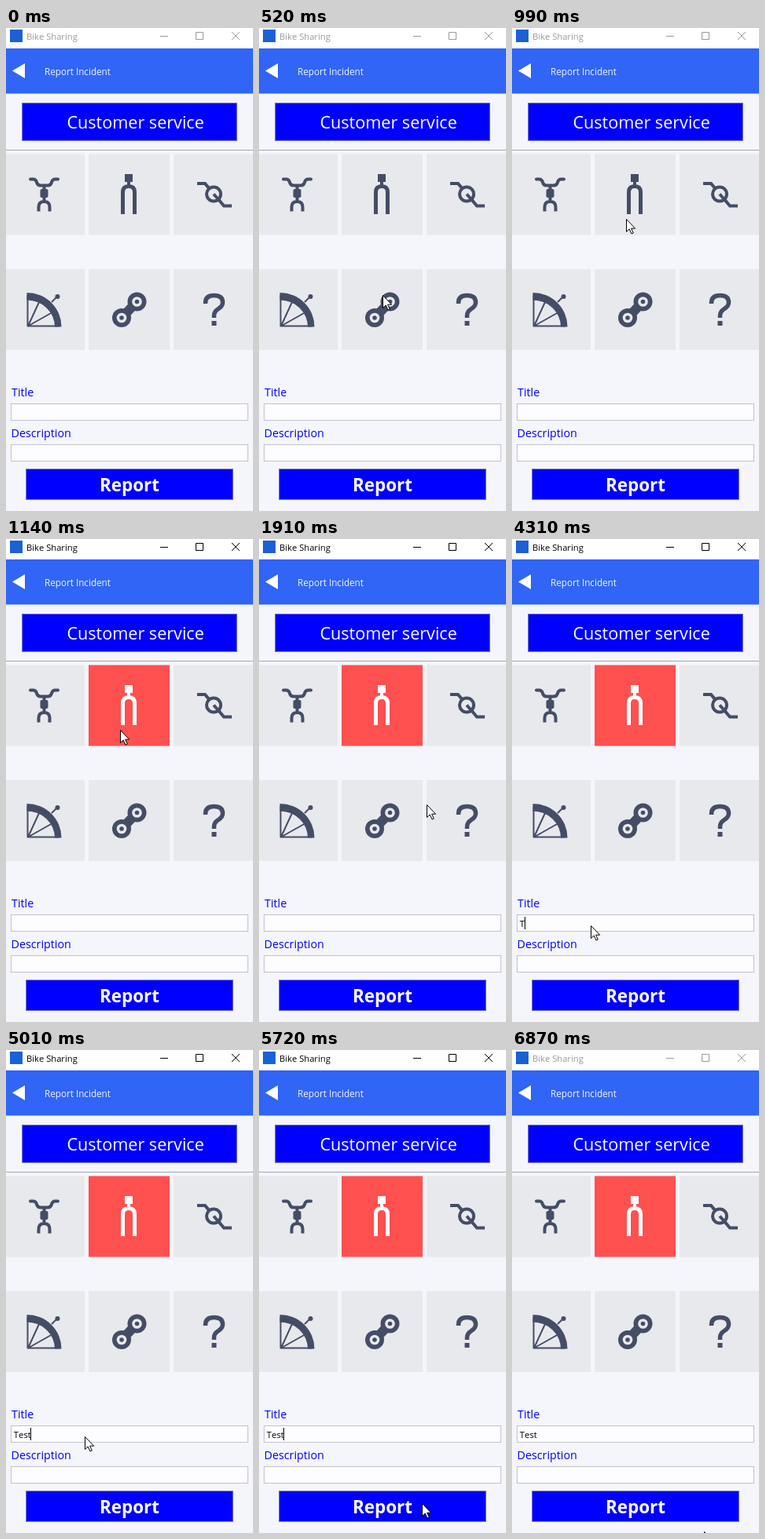
An HTML page that plays this animation: 314x615 px, repeating every 6.95 s.

```html
<!DOCTYPE html>
<html lang="en">
<head>
<meta charset="utf-8">
<title>Report Incident</title>
<style>
  html, body { margin: 0; width: 100%; height: 100%; overflow: hidden; background: #f4f6fb; }
  svg { display: block; width: 314px; height: 615px; }
  text { font-family: "Open Sans", "Noto Sans", sans-serif; font-kerning: none; white-space: pre; }
  .icon { color: #454d66; fill: none; stroke: currentColor; stroke-width: 4; }
  .solid { fill: currentColor; stroke: none; }
  .tile { fill: #e8e9ed; }
  .button { fill: #00f; stroke: #8484bc; }
  .field { fill: #fdfdff; stroke: #c0c2cb; }
  .label { fill: #00f; font-size: 14.3px; }
</style>
</head>
<body>
<svg viewBox="0 0 314 615">
  <!-- window bar -->
  <rect width="314" height="26" fill="#fff"/>
  <rect x="5" y="2" width="16" height="16" fill="#1c60d6"/>
  <g id="bar" color="#999">
    <text x="26" y="15" font-size="11.2" fill="currentColor">Bike Sharing</text>
    <path d="M196 10.5h10M241.5 5.5h9v9h-9zM287 5l10 10M297 5l-10 10" fill="none" stroke="currentColor"/>
  </g>

  <!-- page header -->
  <rect y="26" width="314" height="57.5" fill="#3065f5"/>
  <path d="M8 54.5 24 45V64z" fill="#fff"/>
  <text x="49" y="60" font-size="11.7" fill="#f2f5ff">Report Incident</text>

  <rect class="button" x="20.5" y="95.5" width="273" height="48"/>
  <text x="77.4" y="128" font-size="21.6" fill="#fff">Customer service</text>
  <path d="M0 155.5h314" stroke="#a3a5ab"/>

  <g id="tiles" class="tile"></g>

  <!-- handlebar -->
  <g class="icon">
    <path d="M31 192.5h3.5q3.5 0 4.5 4t5 4h9q4 0 5-4t4.5-4H66" stroke-linecap="round"/>
    <path d="M48.5 201v20M41.5 233.5V228q0-7 7-7t7 7v5.5"/>
    <rect class="solid" x="43.5" y="205" width="10" height="11" rx="2"/>
  </g>

  <!-- fork -->
  <g class="icon" id="fork">
    <rect class="solid" x="151" y="186" width="10" height="10"/>
    <path d="M156 196v6"/>
    <path d="M148.5 237V209q0-7.500 7.500-7.500t7.500 7.500v28" stroke-width="5"/>
  </g>

  <!-- crank -->
  <g class="icon">
    <path d="M243 198h10l24 28.500h10"/>
    <circle cx="264" cy="211.500" r="9" class="tile"/>
    <path d="m264 211.500 8 9"/>
  </g>

  <!-- wheel -->
  <g class="icon" stroke-linejoin="round">
    <path class="solid" d="M26.500 337a44 43.500 0 0 1 44 43.500H62a35.500 34 0 0 0-35.500-34z"/>
    <path d="M27.500 340v39.500h40M28 379.500 42 349M28 379.500 59 362" style="stroke-width: 2"/>
    <path d="m58 349 7-7" style="stroke-width: 2"/>
    <circle class="solid" cx="65.500" cy="342" r="3"/>
  </g>

  <!-- chain link -->
  <g class="icon">
    <path d="m147 369 19.500-20.500" style="stroke-width: 12"/>
    <g id="roller">
      <circle class="solid" cx="147" cy="369" r="12"/>
      <circle class="tile" cx="147" cy="369" r="6.300" stroke="none"/>
      <circle class="solid" cx="147" cy="369" r="2.800"/>
    </g>
    <use href="#roller" x="19.500" y="-20.500"/>
  </g>

  <!-- question mark -->
  <g class="icon">
    <path d="M253.500 351v-1q0-9.500 11-9.500t11 9q0 4.500-5.500 8t-5.500 8.500v3" style="stroke-width: 5.500"/>
    <rect class="solid" x="261.500" y="373" width="6" height="6"/>
  </g>

  <!-- form -->
  <text class="label" x="7" y="469">Title</text>
  <rect class="field" x="6.500" y="478.500" width="301" height="21"/>
  <text class="label" x="6.500" y="521">Description</text>
  <rect class="field" x="6.500" y="530.500" width="301" height="21"/>
  <text id="typed" x="9.800" y="494" font-size="11.300"></text>
  <rect id="caret" y="481" width="1" height="16" opacity="0"/>
  <rect class="button" x="25.500" y="561.500" width="263" height="39"/>
  <text x="119" y="590" font-size="22.400" font-weight="700" fill="#fff">Report</text>

  <path id="pointer" d="M.5.500v16l3.700-3.500 2.800 6 2.300-1-2.700-5.800h5z" fill="#fff" stroke="#000" opacity="0"/>
</svg>
<script>
const LOOP = 6950;
const $ = id => document.getElementById(id);

function add(parent, tag, attrs = {}, text = "") {
  const el = document.createElementNS("http://www.w3.org/2000/svg", tag);
  for (const name in attrs) el.setAttribute(name, attrs[name]);
  el.textContent = text;
  parent.append(el);
  return el;
}

// Each step is [time, value]; a value holds until the next step.
function play(el, prop, steps) {
  const frames = steps.map(([t, v]) => ({ offset: t / LOOP, [prop]: v, easing: "steps(1, end)" }));
  frames.push({ offset: 1, [prop]: steps.at(-1)[1] });
  const anim = el.animate(frames, { duration: LOOP, iterations: Infinity });
  anim.startTime = document.timeline.currentTime;
}

const move = (x, y) => `translate(${x}px, ${y}px)`;

// Tile grid: three columns, two rows.
const tiles = Array.from({ length: 6 }, (_, i) => add($("tiles"), "rect", {
  x: -3 + 108 * (i % 3), y: i < 3 ? 160.5 : 307, width: 103, height: 103
}));

const PACE = 77;
const steady = k => k;
const speedUp = k => k ** 1.5;
const slowDown = k => 1 - (1 - k) ** 2;
let spot = [200, 620];

function leg(start, end, to, ease, bend = 0) {
  const from = spot;
  const last = Math.round((end - start) / PACE);
  spot = to;
  return Array.from({ length: last + 1 }, (_, i) => {
    const k = ease((i + 1) / (last + 1));
    const x = from[0] + (to[0] - from[0]) * k + bend * Math.sin(Math.PI * k);
    const y = from[1] + (to[1] - from[1]) * k;
    const t = last ? start + (end - start) * i / last : start;
    return [Math.round(t / 10) * 10, move(Math.round(x), Math.round(y))];
  });
}

play($("pointer"), "transform", [
  [0, move(...spot)],
  ...leg(210, 900, [143, 246], slowDown),
  ...leg(990, 990, [145, 243], steady),
  ...leg(1520, 1910, [213, 338], speedUp, -35),
  ...leg(1990, 2450, [100, 492], slowDown, 21),
  ...leg(5490, 5720, [207, 577], steady),
  ...leg(5800, 5950, [244, 613], slowDown)
]);
play($("pointer"), "opacity", [[0, 0], [210, 1]]);

// Window focus and the chosen tile.
play($("bar"), "color", [[0, "#999"], [1140, "#000"], [6870, "#999"]]);
play(tiles[1], "fill", [[0, "#e8e9ed"], [1140, "#ff5050"]]);
play($("fork"), "color", [[0, "#454d66"], [1140, "#fff"]]);

// Typing: the caret follows the measured width of the text.
const typed = $("typed");
const keys = [4310, 4630, 4780, 5010];
const letters = [..."Test"].map(c => add(typed, "tspan", {}, c));
letters.forEach((el, i) => play(el, "fill", [[0, "transparent"], [keys[i], "#000"]]));
const caretAt = n => move(Math.round(9.4 + (n && typed.getSubStringLength(0, n))), 0);
play($("caret"), "transform", [[0, caretAt(0)], ...keys.map((t, i) => [t, caretAt(i + 1)])]);
play($("caret"), "opacity", [[0, 0], [2600, 0.25], [4310, 1], [6870, 0]]);
</script>
</body>
</html>
```
